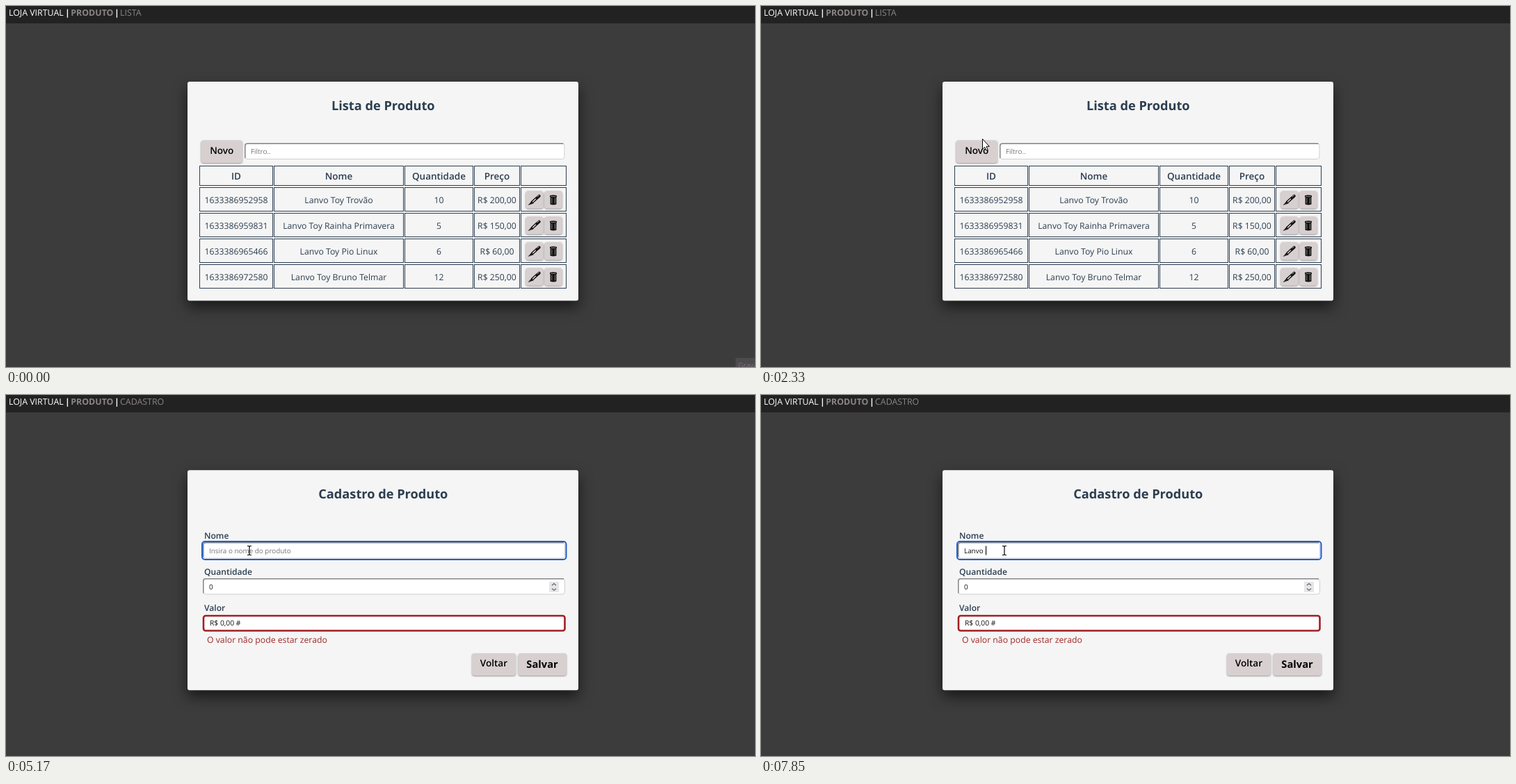
An HTML page for the animation above (8 s loop, 1077 px wide and 520 px high).

```html
<!DOCTYPE html>
<html lang="pt-BR">
<head>
<meta charset="utf-8">
<title>Loja virtual</title>
<style>
html, body { margin: 0; width: 100%; height: 100%; overflow: hidden; background: #3c3c3c; }
svg { display: block; width: 100%; height: 100%; }
text { font: 12.26px "Open Sans", "Noto Sans", sans-serif; fill: #2c3e50; text-rendering: geometricPrecision; white-space: pre; }
.mid { text-anchor: middle; }
.title { font-size: 18.2px; font-weight: 700; text-anchor: middle; }
.nav { font-size: 12.4px; fill: #fff; }
.nav.b { font-weight: 700; }
.nav.g { fill: #8c8585; }
.th { font-size: 13.5px; font-weight: 600; text-anchor: middle; }
.label { font-size: 12.1px; font-weight: 600; }
.btn { font-size: 13.6px; font-weight: 600; fill: #000; text-anchor: middle; }
.save { font-size: 14.7px; font-weight: 700; }
.val { font-size: 9.9px; fill: #111; }
.hint { fill: #757575; }
.err { fill: #a02626; }
.card { fill: #f5f5f5; filter: drop-shadow(0 9px 10px rgba(0, 0, 0, .6)); }
.key { fill: #d8d0d0; filter: drop-shadow(0 1.5px 1.2px rgba(0, 0, 0, .4)); }
.hover { fill: #b4b1b1; }
.cell { fill: none; stroke: #2c3e50; }
</style>
</head>
<body>
<svg id="stage" viewBox="0 0 1077 520">
  <defs>
    <g id="pen" fill="none" stroke-linecap="round">
      <path d="M-8.5 7L-4.5 2.5L-2 4.6Z" fill="#111" stroke="#111" stroke-width=".6"/>
      <path d="M-3 3L6.6-5.6" stroke="#111" stroke-width="4"/>
      <path d="M-2.6 2.6L1.6-1.2" stroke="#e6dfdf" stroke-width="1.3"/>
      <path d="M4-4.6L6.4-6.4" stroke="#bbb" stroke-width=".9"/>
    </g>
    <g id="bin">
      <path d="M-5-6.3Q0-8 5-6.3V-4.4L4.4-4V6.4Q0 8-4.4 6.4V-4L-5-4.4Z" fill="#111"/>
      <path d="M-2.2-2.8V5.2M2.4-2.8V5.2M-3.6-4.9H3.6" stroke="#a9a1a3" stroke-width=".8"/>
    </g>
  </defs>
  <rect width="1077" height="520" fill="#3c3c3c"/>
  <rect width="1077" height="25" fill="#222"/>
  <text class="nav" x="4" y="14.4">LOJA VIRTUAL</text>
  <text class="nav b" x="84.9" y="14.4">|</text>
  <text class="nav b g" x="93.3" y="14.4">PRODUTO</text>
  <text class="nav b" x="155.9" y="14.4">|</text>
  <text class="nav g" id="crumb" x="164" y="14.4">LISTA</text>

  <rect class="card" id="card" x="261" y="109" width="562" height="315.5" rx="3"/>

  <g id="list">
    <text class="title" x="542.3" y="150">Lista de Produto</text>
    <rect class="key" id="novo" x="280.5" y="193.5" width="59.5" height="32.5" rx="4"/>
    <text class="btn" x="310.3" y="212.8">Novo</text>
    <g data-input="343 197.5 460.5 23.5"></g>
    <text class="val hint" x="352" y="213">Filtro..</text>
    <g id="table"></g>
  </g>

  <g id="form">
    <g id="upper">
      <text class="title" x="542.3" y="149">Cadastro de Produto</text>
      <text class="label" x="285" y="206.8">Nome</text>
      <g data-input="283 212 521 23.5"></g>
      <rect id="focus" x="282" y="211" width="523.5" height="26" rx="4" fill="none" stroke="#1c5fcf" stroke-width="2"/>
      <text class="val" id="name" x="292" y="228"></text>
      <rect id="caret" y="217.5" width="1.1" height="13" fill="#000"/>
      <text class="err" id="short" x="289" y="253">O nome é muito curto</text>
    </g>
    <g id="lower">
      <text class="label" x="285" y="259">Quantidade</text>
      <g data-input="283 264 521 23.5"></g>
      <text class="val" x="292" y="280">0</text>
      <rect x="781" y="269" width="14" height="15" fill="#e6e6e8"/>
      <path d="M785 274.3L788 271.5L791 274.3M785 278.7L788 281.5L791 278.7" fill="none" stroke="#666" stroke-width="1.2"/>
      <text class="label" x="285" y="311.3">Valor</text>
      <rect x="284" y="318" width="519.5" height="21.5" rx="3" fill="#fff" stroke="#a01f24" stroke-width="2.6"/>
      <text class="val" x="293" y="332" style="font-size:10.3px">R$ 0,00 #</text>
      <text class="err" x="289" y="357">O valor não pode estar zerado</text>
      <rect class="key" x="670" y="372" width="63" height="32" rx="4"/>
      <text class="btn" x="701.4" y="391">Voltar</text>
      <rect class="key" x="736.5" y="372" width="69.5" height="32" rx="4"/>
      <text class="btn save" x="771" y="393.3">Salvar</text>
    </g>
  </g>

  <g id="tip">
    <rect x="1049" y="507" width="28" height="13" fill="#4e4b4e"/>
    <text x="1053" y="521" style="font-size:10px;fill:#7a777a">Gravar</text>
  </g>

  <circle id="click" r="10" fill="#ddd61e" opacity=".72"/>
  <g id="pointer">
    <path id="arrow" d="M.5.5V15.2L3.7 12.2L6 17.2L8.2 16.2L6 11.3H10.3Z" fill="#fff" stroke="#000"/>
    <path id="hand" d="M-1 1Q0-.8 1.4 1V7Q3-.2 4 6.6Q6 5.4 6.6 7.6Q9 6.6 9.2 9.5V13Q9 15.5 7.6 19H-.2Q-1.5 16-4 13Q-6 10-3.6 9.6L-1 11.8Z" fill="#fff" stroke="#000"/>
    <path id="beam" d="M-3-6.5H-1L0-5.6L1-6.5H3M0-5.6V5.6M-3 6.5H-1L0 5.6L1 6.5H3" fill="none" stroke="#000" stroke-width="1.2"/>
  </g>
</svg>
<script>
const LOOP = 8000;
const $ = id => document.getElementById(id);
const show = (id, on) => { $(id).style.display = on ? '' : 'none'; };
const move = (id, x, y) => $(id).setAttribute('transform', `translate(${x} ${y})`);

// Inset-style text fields
for (const g of document.querySelectorAll('[data-input]')) {
  const [x, y, w, h] = g.dataset.input.split(' ').map(Number);
  g.innerHTML = `<rect x="${x + .5}" y="${y + .5}" width="${w - 1}" height="${h - 1}" rx="3.5" fill="#fff" stroke="#cfcfcf"/>
    <path d="M${x + .8} ${y + h - 2}V${y + 4}Q${x + .8} ${y + .8} ${x + 4} ${y + .8}H${x + w - 2}" fill="none" stroke="#86868a" stroke-width="1.5"/>`;
}

// Product table
const cols = [[278.5, 105], [385.5, 186], [573.5, 98], [673.5, 65], [740.5, 65]];
const rows = [
  ['1633386952958', 'Lanvo Toy Trovão', '10', 'R$ 200,00'],
  ['1633386959831', 'Lanvo Toy Rainha Primavera', '5', 'R$ 150,00'],
  ['1633386965466', 'Lanvo Toy Pio Linux', '6', 'R$ 60,00'],
  ['1633386972580', 'Lanvo Toy Bruno Telmar', '12', 'R$ 250,00']
];
const line = (cells, y, h, base, cls) => cols.map(([x, w], i) =>
  `<rect class="cell" x="${x}" y="${y}" width="${w}" height="${h}"/>
   <text class="${cls}" x="${x + w / 2}" y="${base}">${cells[i] || ''}</text>`).join('');
const icon = (id, x, y) =>
  `<rect class="key" x="${x - 12.7}" y="${y - 13}" width="25.4" height="25.5" rx="4"/>
   <use href="#${id}" x="${x}" y="${y}"/>`;
$('table').innerHTML = line(['ID', 'Nome', 'Quantidade', 'Preço'], 230.5, 28, 250, 'th') +
  rows.map((r, i) => {
    const y = 261.5 + 37 * i;
    return line(r, y, 34, y + 22.5, 'mid') + icon('pen', 760, y + 17.8) + icon('bin', 787, y + 17.8);
  }).join('');

// Pointer travel: start, end, number of steps, waypoints
const travel = [
  [70, 820, 12, [[1050, 500], [760, 385], [540, 290], [409, 245]]],
  [880, 1630, 11, [[400, 243], [350, 236], [318, 222], [310, 212]]],
  [1700, 2330, 10, [[322, 266], [383, 294], [350, 250], [318, 191]]],
  [2680, 2870, 4, [[314, 195], [300, 206]]],
  [3680, 3880, 4, [[312, 207], [354, 210]]],
  [4280, 4440, 3, [[352, 209], [350, 208]]],
  [4620, 4690, 2, [[350, 218], [350, 224]]]
];
function pointerAt(t) {
  const seg = travel.filter(s => t >= s[0]).pop();
  if (!seg) return null;
  const [from, to, n, pts] = seg;
  const step = Math.min(n - 1, Math.floor((t - from) / (to - from) * (n - 1) + 1e-6));
  const p = step / (n - 1) * (pts.length - 1);
  const i = Math.min(pts.length - 2, Math.floor(p)), f = p - i;
  return pts[i].map((v, k) => v + (pts[i + 1][k] - v) * f);
}
const inside = ([x, y], l, t, r, b) => x > l && x < r && y > t && y < b;

// Typing: time, letters shown, caret position
const typed = [[0, 0, 292], [5560, 1, 297], [5890, 2, 303], [6020, 3, 309],
  [6240, 4, 314], [6780, 5, 320], [7050, 6, 323]];
const between = (t, a, b) => t >= a && t < b;

function draw(t) {
  const form = t >= 3200;
  const short = between(t, 5560, 6020);
  const shift = short ? 10.5 : 0;
  show('list', !form);
  show('form', form);
  show('tip', t < 70);
  $('crumb').textContent = form ? 'CADASTRO' : 'LISTA';
  $('card').setAttribute('y', form ? 108.3 - shift : 109);
  $('card').setAttribute('height', form ? 317 + 2 * shift : 315.5);
  move('upper', 0, -shift);
  move('lower', 0, shift);

  const [, count, caret] = typed.filter(k => t >= k[0]).pop();
  $('name').textContent = count ? 'Lanvo '.slice(0, count) : 'Insira o nome do produto';
  $('name').classList.toggle('hint', !count);
  $('caret').setAttribute('x', caret);
  show('caret', t >= 4690 && !between(t, 5170, 5560) && !between(t, 7320, 7850));
  show('focus', t >= 4690);
  show('short', short);

  const p = pointerAt(t);
  show('pointer', p);
  const hover = !!p && !form && inside(p, 280, 193, 340, 226);
  const beam = !!p && (form ? inside(p, 283, 212, 804, 236) : inside(p, 343, 198, 804, 221));
  $('novo').classList.toggle('hover', hover);
  show('hand', hover);
  show('beam', beam);
  show('arrow', !hover && !beam);
  if (p) {
    move('pointer', ...p);
    move('click', p[0] - (hover ? 1 : 0), p[1] + (hover ? 1 : 0));
  }
  show('click', between(t, 3130, 3200) || between(t, 4690, 4880));
}

function tick() {
  draw(performance.now() % LOOP);
  requestAnimationFrame(tick);
}
tick();
</script>
</body>
</html>
```
